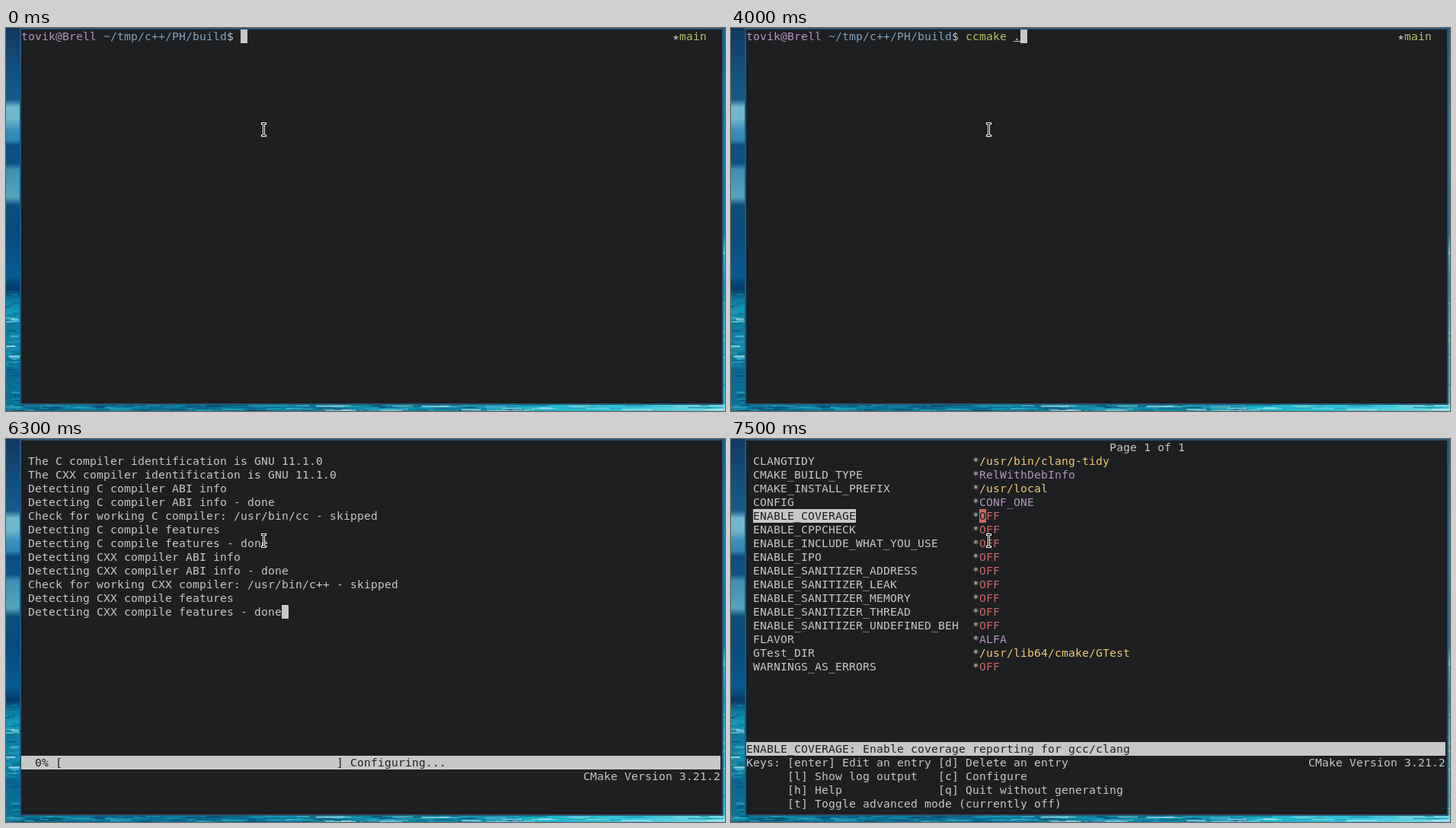
An HTML page with a canvas that plays this animation: 944x503 px, repeating every 8 s.

```html
<!DOCTYPE html>
<html lang="en">
<head>
<meta charset="utf-8">
<title>ccmake session</title>
<style>
  html, body { margin: 0; width: 100%; height: 100%; overflow: hidden; background: #1d1f21; }
  canvas { display: block; }
</style>
</head>
<body>
<canvas id="stage" width="944" height="503"></canvas>
<script>
const W = 944, H = 503, LOOP = 8000;
const COLS = 102, CELL_W = 9, CELL_H = 18, LEFT = 20, TOP = 2;
const BG = '#1d1f21', FG = '#c5c8c6', RED = '#cc6666', GREEN = '#b5bd68',
      YELLOW = '#f0c674', BLUE = '#81a2be', MAUVE = '#b294bb', BORDER = '#285577';
const FONT = '11pt "DejaVu Sans Mono", monospace';

const ctx = document.getElementById('stage').getContext('2d', { alpha: false });

// ---- terminal grid helpers ----
function block(row, col, count, color) {
  ctx.fillStyle = color;
  ctx.fillRect(LEFT + col * CELL_W, TOP + row * CELL_H, count * CELL_W, CELL_H);
}

function print(row, col, text, color = FG, bold = false) {
  ctx.font = (bold ? 'bold ' : '') + FONT;
  ctx.fillStyle = color;
  [...text].forEach((ch, i) => {
    if (ch !== ' ') ctx.fillText(ch, LEFT + (col + i) * CELL_W, TOP + row * CELL_H + 14);
  });
}

function inverse(row, col, text, color = FG) {
  block(row, col, text.length, color);
  print(row, col, text, BG);
}

function bar(row, text) {
  block(row, 0, COLS, FG);
  print(row, 0, text, BG);
}

function latest(steps, t) {
  return steps.filter(step => step[0] <= t).pop();
}

// ---- shell prompt ----
const USER = 'tovik@Brell', DIR = '~/tmp/c++/PH/build';
const TYPED = [
  [0, ''], [800, 'c'], [1000, 'cm'], [1400, 'c'], [1600, 'cc'], [1700, 'ccm'],
  [2000, 'ccma'], [2500, 'ccmak'], [2600, 'ccmake'], [2800, 'ccmake '],
  [3100, 'ccmake ,'], [3200, 'ccmake ,,'], [3600, 'ccmake ,'], [3700, 'ccmake '],
  [4000, 'ccmake .'], [4200, 'ccmake ..']
];

function star(cx, cy, r) {
  ctx.beginPath();
  for (let i = 0; i < 10; i++) {
    const a = -Math.PI / 2 + i * Math.PI / 5, d = i % 2 ? r * 0.42 : r;
    ctx.lineTo(cx + d * Math.cos(a), cy + d * Math.sin(a));
  }
  ctx.fillStyle = '#a3a6a8';
  ctx.fill();
}

function drawShell(t) {
  const start = USER.length + DIR.length + 3;
  print(0, 0, USER, MAUVE);
  print(0, USER.length + 1, DIR, BLUE);
  print(0, start - 2, '$');
  star(879.5, 12.5, 4);
  print(0, 96, 'main', GREEN);

  const text = latest(TYPED, t)[1];
  const [command, arg = ''] = text.split(' ');
  const known = command === 'cc' || command === 'ccmake';
  print(0, start, command, known ? GREEN : RED, !known);
  print(0, start + command.length + 1, arg);
  if (arg.startsWith('.')) {
    ctx.fillStyle = FG;
    ctx.fillRect(LEFT + (start + 7) * CELL_W, 17, arg.length * CELL_W, 1);
  }
  block(0, start + text.length, 1, FG);
}

// ---- ccmake screens ----
const VERSION = 'CMake Version 3.21.2';

function drawFrame(page, status) {
  print(0, 53, `Page ${page} of 1`);
  bar(22, status);
  print(23, 0, 'Keys: [enter] Edit an entry [d] Delete an entry');
  print(23, COLS - VERSION.length, VERSION);
  print(24, 6, '[l] Show log output   [c] Configure');
  print(25, 6, '[h] Help              [q] Quit without generating');
  print(26, 6, '[t] Toggle advanced mode (currently off)');
}

function drawEmpty() {
  drawFrame(0, 'EMPTY CACHE:');
  print(1, 1, 'E');
  inverse(1, 2, 'MPTY CACHE');
}

const detect = (lang, cc) => [
  `Detecting ${lang} compiler ABI info`,
  `Detecting ${lang} compiler ABI info - done`,
  `Check for working ${lang} compiler: /usr/bin/${cc} - skipped`,
  `Detecting ${lang} compile features`,
  `Detecting ${lang} compile features - done`
];
const LOG = [
  'The C compiler identification is GNU 11.1.0',
  'The CXX compiler identification is GNU 11.1.0',
  ...detect('C', 'cc'), ...detect('CXX', 'c++')
];
const LOG_STEPS = [[6000, 2], [6100, 3], [6200, 8], [6300, 12]];

function drawConfigure(t) {
  const count = latest(LOG_STEPS, t)[1];
  LOG.slice(0, count).forEach((line, i) => print(i + 1, 1, line));
  block(count, 1 + LOG[count - 1].length, 1, FG);
  bar(23, '  0% [' + ' '.repeat(40) + '] Configuring...');
  print(24, COLS - VERSION.length, VERSION);
}

const off = name => ['ENABLE_' + name, 'OFF', RED];
const ENTRIES = [
  ['CLANGTIDY', '/usr/bin/clang-tidy', YELLOW, 'Path to a program.'],
  ['CMAKE_BUILD_TYPE', 'RelWithDebInfo', MAUVE, 'Choose the type of build.'],
  ['CMAKE_INSTALL_PREFIX', '/usr/local', YELLOW,
    'Install path prefix, prepended onto install directories.'],
  ['CONFIG', 'CONF_ONE', MAUVE, 'Configuration to use'],
  [...off('COVERAGE'), 'Enable coverage reporting for gcc/clang'],
  ...['CPPCHECK', 'INCLUDE_WHAT_YOU_USE', 'IPO', 'SANITIZER_ADDRESS', 'SANITIZER_LEAK',
    'SANITIZER_MEMORY', 'SANITIZER_THREAD', 'SANITIZER_UNDEFINED_BEH'].map(off),
  ['FLAVOR', 'ALFA', MAUVE],
  ['GTest_DIR', '/usr/lib64/cmake/GTest', YELLOW],
  ['WARNINGS_AS_ERRORS', 'OFF', RED]
];
const SELECTED = [[6400, 0], [7000, 1], [7200, 2], [7300, 3], [7500, 4]];

function drawEntries(t) {
  const selected = latest(SELECTED, t)[1];
  const [label, , , help] = ENTRIES[selected];
  drawFrame(1, `${label}: ${help}`);
  ENTRIES.forEach(([name, value, color], i) => {
    const row = i + 1;
    print(row, 33, '*');
    print(row, 34, value, color);
    if (i === selected) {
      inverse(row, 1, name);
      inverse(row, 34, value[0], color);
    } else {
      print(row, 1, name);
    }
  });
}

// ---- desktop ----
function makeSea() {
  const sea = document.createElement('canvas');
  sea.width = W;
  sea.height = H;
  const g = sea.getContext('2d');
  let seed = 7;
  const random = () => (seed = seed * 16807 % 2147483647) / 2147483647;

  function strip(x, y, w, h, stops, across = false) {
    const size = across ? W : H;
    const grad = g.createLinearGradient(0, 0, across ? W : 0, across ? 0 : H);
    stops.forEach(([at, color]) => grad.addColorStop(at / size, color));
    g.fillStyle = grad;
    g.fillRect(x, y, w, h);
  }
  function streaks(count, x, y, w, h, length, tones) {
    for (let i = 0; i < count; i++) {
      g.globalAlpha = 0.3 + random() * 0.5;
      g.fillStyle = tones[Math.floor(random() * tones.length)];
      g.fillRect(x + random() * w - length / 2, y + random() * h, length * (0.4 + random()), 1 + random() * 1.5);
    }
    g.globalAlpha = 1;
  }
  const deep = ['#0a5f86', '#0f86a6', '#2fa9c2', '#064a70'];
  const foam = ['#1fa6c4', '#7fd0de', '#b4e6ee', '#0c7898'];

  strip(0, 0, W, H, [
    [0, '#123a63'], [60, '#13507e'], [94, '#165a88'], [104, '#74b8d0'], [120, '#6fb4cc'],
    [134, '#3a90ba'], [147, '#2f86b2'], [154, '#0e4c7e'], [178, '#0e5284'], [186, '#3f8fb2'],
    [200, '#4797b6'], [222, '#55a6bf'], [233, '#0d4d7a'], [270, '#084a7c'], [325, '#075a90'],
    [343, '#063a66'], [358, '#0b7ea2'], [374, '#119db8'], [388, '#0c7c9e'], [425, '#1088a6'],
    [450, '#0a6890'], [503, '#0b7898']
  ]);
  strip(940, 0, 4, H, [
    [0, '#17628e'], [120, '#1f80a8'], [270, '#1478a2'], [290, '#45b8d2'],
    [340, '#1c8cb0'], [390, '#40b4cc'], [503, '#35b8d0']
  ]);
  strip(0, 494, W, 9, [
    [0, '#0b7898'], [380, '#0d7c9c'], [640, '#128caa'], [690, '#1cb4cc'],
    [820, '#38c4d8'], [W, '#7cdce8']
  ], true);
  streaks(50, 0, 345, 18, 150, 12, deep);
  streaks(35, 0, 372, 18, 75, 14, foam);
  streaks(12, 941, 290, 3, 205, 4, foam);
  streaks(230, 0, 494, 680, 9, 22, deep);
  streaks(60, 330, 494, 614, 9, 30, foam);
  return sea;
}

function drawPointer() {
  const shape = (color, inset) => {
    ctx.fillStyle = color;
    ctx.fillRect(335 + inset, 124 + inset, 7 - 2 * inset, 3 - 2 * inset);
    ctx.fillRect(337 + inset, 124 + inset, 3 - 2 * inset, 19 - 2 * inset);
    ctx.fillRect(335 + inset, 140 + inset, 7 - 2 * inset, 3 - 2 * inset);
  };
  shape('#ffffff', 0);
  shape('#000000', 1);
}

const sea = makeSea();

function draw(t) {
  ctx.drawImage(sea, 0, 0);
  ctx.fillStyle = BORDER;
  ctx.fillRect(18, 0, 924, 495);
  ctx.fillStyle = BG;
  ctx.fillRect(20, 2, 920, 491);

  if (t < 4500) drawShell(t);
  else if (t < 6000) drawEmpty();
  else if (t < 6400) drawConfigure(t);
  else drawEntries(t);
  drawPointer();
}

function tick() {
  draw(performance.now() % LOOP);
  requestAnimationFrame(tick);
}
tick();
</script>
</body>
</html>
```
